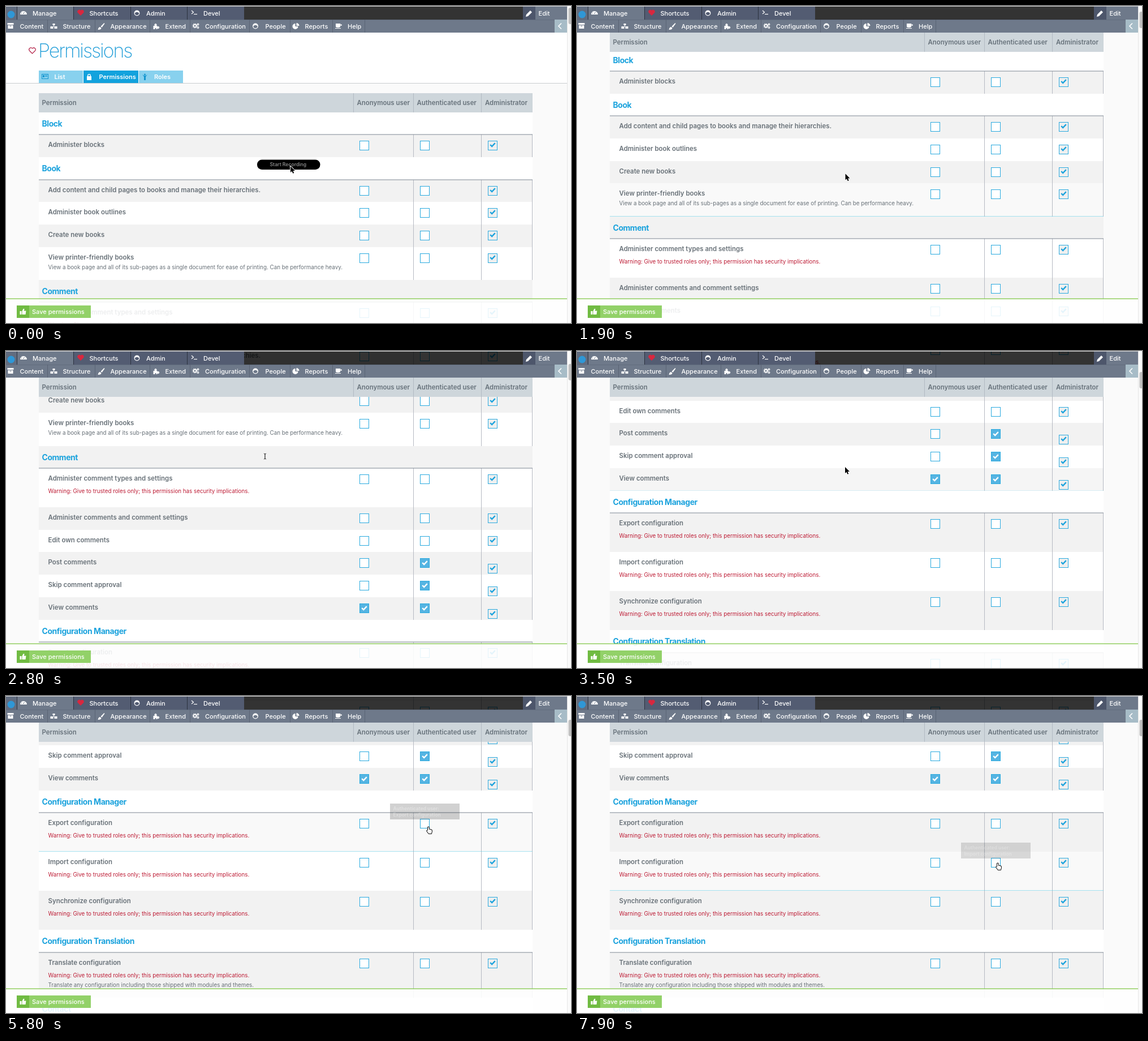
Animation of 999x560 px, one loop 8 s. Source, as an HTML page with a canvas:

```html
<!DOCTYPE html>
<html lang="en">
<head>
<meta charset="utf-8">
<title>Permissions</title>
<style>
html, body { margin: 0; width: 100%; height: 100%; overflow: hidden; background: #fff; }
canvas { display: block; width: 999px; height: 560px; }
</style>
</head>
<body>
<canvas id="stage" width="999" height="560"></canvas>
<script>
const ctx = document.getElementById('stage').getContext('2d');
const LOOP = 8000, STEP = 100;
const BLUE = '#1ca3dd', BODY = '#687178', CYAN = '#55cbe8', RED = '#bd1b34';
const COLS = [633.5, 740.5, 860.5];

const ICONS = {
  gauge: 'M0 9A6 6 0 1 1 12 9ZM6 8L9 4L5 7ZM2 7H3V6H2ZM3 4H4V3H3Z',
  heart: 'M6 11L1 6A3 3 0 0 1 6 2A3 3 0 0 1 11 6Z',
  box: 'M0 0H11V3H0ZM1 4H10V10H1ZM4 5V6H7V5Z',
  tree: 'M4 1H8V4H4ZM0 6H5V10H0ZM7 6H12V10H7ZM5.5 4H6.5V7H5.5Z',
  brush: 'M11 0L5 6L7 8L12 1ZM4 7Q1 7 0 12Q6 12 6 9Z',
  puzzle: 'M1 5H4A2 2 0 1 1 6 5H8V7A2 2 0 1 1 8 9V11H6V9H4V11H1Z',
  pie: 'M5 1A5 5 0 1 0 10 6H5ZM7 0A5 5 0 0 1 12 5H7Z',
  cup: 'M1 1H9V6Q9 8 5 8Q1 8 1 6ZM9 2Q12 2 12 4Q12 5 9 5V4H10V3H9ZM0 9H10V10H0Z',
  pencil: 'M0 12L1 8L8 1L11 4L4 11Z',
  lock: 'M1 5H2V4A3 3 0 0 1 8 4V5H9V12H1ZM3.3 5H6.7V4A1.7 1.7 0 0 0 3.3 4Z',
  card: 'M0 1H12V10H0ZM1 2V9H11V2ZM2 3H5V7H2ZM6 3H10V4H6ZM6 5H10V6H6Z',
  person: 'M4 2A1.5 1.5 0 1 1 7 2A1.5 1.5 0 1 1 4 2ZM1 2L4 4H7L10 2L7 6V12H4V6Z',
  thumb: 'M0 5H3V11H0ZM4 5L6 1Q8 0 8 2L7 4.5H11L10 11H4Z',
  arrow: 'M0 0V11L2.5 8.8L4.3 12.8L6.2 12L4.5 8.1H8Z',
  hand: 'M2 0.8Q3 0 3.8 1V4.5L8 5.4Q9.2 6 9 8L8 12H3.5L0.2 7.5Q0 6 2 6.6Z'
};
for (const name in ICONS) ICONS[name] = new Path2D(ICONS[name]);

// [label, kind, checked columns, administrator box offset]
const ROWS = [
  ['Block', 'section'],
  ['Administer blocks', 'plain'],
  ['Book', 'section'],
  ['Add content and child pages to books and manage their hierarchies.', 'plain'],
  ['Administer book outlines', 'plain'],
  ['Create new books', 'plain'],
  ['View printer-friendly books', 'note'],
  ['Comment', 'section'],
  ['Administer comment types and settings', 'warn'],
  ['Administer comments and comment settings', 'plain'],
  ['Edit own comments', 'plain'],
  ['Post comments', 'plain', [1], 10],
  ['Skip comment approval', 'plain', [1], 10],
  ['View comments', 'plain', [0, 1], 10],
  ['Configuration Manager', 'section'],
  ['Export configuration', 'warn'],
  ['Import configuration', 'warn'],
  ['Synchronize configuration', 'warn'],
  ['Configuration Translation', 'section'],
  ['Translate configuration', 'both'],
  ['Contact', 'section']
];
const HEIGHT = { section: 39.4, plain: 39.7, note: 58.4, warn: 69.1, both: 80 };
const WARNING = 'Warning: Give to trusted roles only; this permission has security implications.';
const PRINT_NOTE = 'View a book page and all of its sub-pages as a single document for ease of printing. Can be performance heavy.';
const SHIP_NOTE = 'Translate any configuration including those shipped with modules and themes.';

const SCROLL = [[0, 0], [1650, 0], [2200, 260], [2600, 260], [3300, 544.5], [3550, 544.5], [4000, 624.5], [LOOP, 624.5]];
const POINTER = [
  [0, 503, 283, 'arrow'], [700, 503, 283, 'arrow'], [1250, 491, 440, 'arrow'], [1550, 487, 376, 'arrow'],
  [1700, 487, 376, 'arrow'], [2150, 457, 185, 'beam'], [2700, 457, 185, 'beam'], [3400, 474, 205, 'arrow'],
  [3750, 474, 205, 'arrow'], [4200, 637, 231, 'hand'], [5200, 637, 231, 'hand'], [5600, 745, 231, 'hand'],
  [6200, 745, 231, 'hand'], [6700, 863, 290, 'hand'], [7250, 863, 290, 'hand'], [7650, 742, 295, 'hand'],
  [LOOP, 742, 295, 'hand']
];
// [from, to, row index]
const HOVERS = [[1150, 2500, 6], [3410, 3750, 13], [4500, 6400, 15], [6400, 8400, 16]];
// [from, to, column, centre y, lines]
const TIPS = [
  [4250, 5350, 0, 226, 'Anonymous user: Export', 'configuration'],
  [5700, 6350, 1, 226, 'Authenticated user:', 'Export configuration'],
  [6870, 7450, 2, 295, 'Administrator: Import', 'configuration'],
  [7825, 8600, 1, 295, 'Authenticated user:', 'Import configuration']
];

const clamp = v => Math.max(0, Math.min(1, v));
const ease = p => p * p * (3 - 2 * p);
const fade = (t, from, to, inMs, outMs) => clamp(Math.min((t - from) / inMs, (to - t) / outMs));

function sample(keys, t) {
  let i = 0;
  while (i < keys.length - 2 && t >= keys[i + 1][0]) i++;
  const a = keys[i], b = keys[i + 1], p = ease(clamp((t - a[0]) / (b[0] - a[0])));
  return a.map((v, k) => typeof v === 'number' ? v + (b[k] - v) * p : p > 0.6 ? b[k] : v);
}

function rect(x, y, w, h, color) {
  ctx.fillStyle = color;
  ctx.fillRect(x, y, w, h);
}

function text(str, x, cy, size, weight, color, spacing = 0) {
  ctx.font = `${weight} ${size}px Inter, "Open Sans", sans-serif`;
  ctx.letterSpacing = spacing + 'px';
  ctx.fillStyle = color;
  ctx.fillText(str, x, cy + size * 0.36);
}

function icon(name, x, y, color, outline) {
  ctx.save();
  ctx.translate(x, y);
  if (outline) {
    ctx.strokeStyle = outline;
    ctx.lineWidth = 2;
    ctx.lineJoin = 'round';
    ctx.stroke(ICONS[name]);
  }
  ctx.fillStyle = color;
  ctx.fill(ICONS[name], 'evenodd');
  ctx.restore();
}

function line(points, color, width) {
  ctx.beginPath();
  points.forEach(([x, y]) => ctx.lineTo(x, y));
  ctx.strokeStyle = color;
  ctx.lineWidth = width;
  ctx.stroke();
}

function disc(x, y, r, color) {
  ctx.beginPath();
  ctx.arc(x, y, r, 0, 7);
  ctx.fillStyle = color;
  ctx.fill();
}

function ring(x, y, r, width, dash = []) {
  ctx.beginPath();
  ctx.arc(x, y, r, 0, 7);
  ctx.setLineDash(dash);
  ctx.strokeStyle = '#fff';
  ctx.lineWidth = width;
  ctx.stroke();
  ctx.setLineDash([]);
}

function face(x, y) {
  ring(x, y, 4.3, 1.3);
  ctx.beginPath();
  ctx.arc(x, y, 4.5, Math.PI, 0);
  ctx.lineTo(x, y - 2);
  ctx.fillStyle = '#fff';
  ctx.fill();
}

function gears(x, y) {
  ring(x + 3.5, y + 5, 2.4, 1.6);
  ring(x + 3.5, y + 5, 3.8, 1.2, [1.5, 1.5]);
  ring(x + 9, y + 2.5, 1.3, 1.2);
  ring(x + 9, y + 8, 1.3, 1.2);
}

function tick(x, y, color) {
  line([[x - 4.3, y - 0.5], [x - 1.3, y + 2.5], [x + 4.3, y - 3.3]], color, 2.4);
}

function checkbox(x, y, state) {
  const fill = { on: '#55b4e2', locked: '#efefef' }[state] || '#fff';
  rect(x - 8.5, y - 8.5, 17, 17, fill);
  ctx.strokeStyle = '#2aaadf';
  ctx.lineWidth = 1;
  ctx.strokeRect(x - 8, y - 8, 16, 16);
  if (state === 'on') tick(x, y, '#fff');
  if (state === 'locked') tick(x, y - 1, BLUE);
}

function drawRow([label, kind, checked = [], shift = 0], index, y, bottom, t) {
  const h = bottom - y;
  rect(58, y, 873, h, index % 2 ? '#f2f2f2' : '#fff');
  if (kind === 'section') {
    text(label, 63.5, y + 20, 14, 700, BLUE, -0.45);
    return;
  }
  const hover = HOVERS.reduce((m, [a, b, row]) => row === index ? Math.max(m, fade(t, a, b, 250, 150)) : m, 0);
  ctx.globalAlpha = hover;
  rect(58, y, 873, h, '#f9f9f9');
  ctx.globalAlpha = 1;
  [720, 840, 930].forEach(x => rect(x, y, 1, h, '#b6bac3'));
  text(label, 74.5, y + 18, 11.45, 600, BODY);
  if (kind === 'warn' || kind === 'both') text(WARNING, 74.5, y + 40.5, 9.8, 400, RED);
  if (kind === 'note') text(PRINT_NOTE, 74.5, y + 35.5, 9.8, 400, BODY);
  if (kind === 'both') text(SHIP_NOTE, 74.5, y + 57.5, 9.8, 400, BODY);
  const cy = y + 19.5;
  COLS.forEach((x, col) =>
    checkbox(x, cy + (col === 2 ? shift : 0), col === 2 ? 'locked' : checked.includes(col) ? 'on' : 'off'));
  if (label.startsWith('Export')) {
    const on = fade(t, 4510, 5150, 150, 150);
    ctx.globalAlpha = on;
    if (on > 0.9) checkbox(COLS[0], cy, 'on');
    else if (on > 0) tick(COLS[0] + 0.5, cy - 0.5, '#55b4e2');
    ctx.globalAlpha = 1;
  }
  ctx.globalAlpha = hover;
  rect(58, bottom - 0.5, 873, 1, CYAN);
  ctx.globalAlpha = 1;
}

function drawPageTop(s) {
  rect(0, 0, 992, 560, '#fafafa');
  rect(0, 0, 992, 136 - s, '#fff');
  rect(0, 136 - s, 992, 1, '#c9cccf');
  ctx.save();
  ctx.translate(40.5, 73 - s);
  ctx.strokeStyle = '#b5264c';
  ctx.lineWidth = 1.2;
  ctx.stroke(ICONS.heart);
  ctx.restore();
  text('Permissions', 57, 79 - s, 34, 200, '#249fd9', -2.1);
  const tabs = [['List', 58, 78, 85.5, 'card'], ['Permissions', 137, 97, 164.5, 'lock'], ['Roles', 235, 78, 262, 'person']];
  tabs.forEach(([label, x, w, tx, glyph], i) => {
    rect(x, 114 - s, w, 22, i === 1 ? '#12a2dd' : '#88d1ee');
    icon(glyph, x + 5, 119 - s, i === 1 ? '#fff' : '#1596cf');
    text(label, tx, 125.5 - s, 11, 600, '#fff');
  });
}

function drawTable(s, t) {
  let top = 188;
  ROWS.forEach((row, i) => {
    const next = top + HEIGHT[row[1]];
    const y = Math.round(top - s), bottom = Math.round(next - s);
    if (bottom > -2 && y < 562) drawRow(row, i, y, bottom, t);
    top = next;
  });
  top = 188;
  ROWS.forEach(row => {
    top += HEIGHT[row[1]];
    if (row[1] === 'section') rect(58, Math.round(top - s) - 0.5, 873, 1, '#7f8894');
  });
  const y = Math.round(Math.max(47, 154 - s));
  rect(58, y, 873, 34, '#ced6db');
  [614, 720, 840].forEach(x => rect(x, y, 1, 34, '#b2bac3'));
  [['Permission', 63.5], ['Anonymous user', 620.5], ['Authenticated user', 726.5], ['Administrator', 847]]
    .forEach(([label, x]) => text(label, x, y + 17, 11.4, 600, '#67727b'));
}

function drawToolbar() {
  rect(0, 0, 992, 1, '#dcdcdc');
  rect(421, 1, 493, 23, 'rgba(0,0,0,.8)');
  rect(0, 1, 421, 23, '#535c72');
  rect(0, 1, 19, 23, '#616c7f');
  rect(20, 1, 99, 23, '#6e798a');
  [19, 119, 220, 320].forEach(x => rect(x, 1, 1, 23, '#2c323f'));
  disc(9, 15, 6.5, '#2f97d6');
  icon('gauge', 25, 6, '#fff');
  icon('heart', 126, 6, '#d9273f');
  face(231.5, 12.5);
  line([[328, 8], [331.5, 11], [328, 14]], '#fff', 1.2);
  line([[332, 14.5], [338, 14.5]], '#fff', 1.2);
  [['Manage', 47], ['Shortcuts', 147.5], ['Admin', 248], ['Devel', 349]]
    .forEach(([label, x]) => text(label, x, 13, 11, 500, '#fff'));
  rect(914, 1, 22, 23, '#4d566b');
  rect(936, 1, 56, 23, '#6e798a');
  icon('pencil', 919, 7, '#fff');
  text('Edit', 941.5, 13, 11, 500, '#fff');

  rect(0, 24, 992, 23, '#6e798a');
  rect(0, 24, 992, 1, '#626d7e');
  const menu = [['Content', 24.5, 73, 'box'], ['Structure', 100.5, 157, 'tree'], ['Appearance', 184.5, 254, 'brush'],
    ['Extend', 281.5, 325, 'puzzle'], ['Configuration', 352, 430, ''], ['People', 458.5, 502, ''],
    ['Reports', 528.5, 577, 'pie'], ['Help', 604, 634, 'cup']];
  menu.forEach(([label, x, edge, glyph]) => {
    text(label, x, 36, 11, 500, '#fff');
    rect(edge, 24, 1, 23, '#5a6475');
    if (glyph) icon(glyph, x - 22, 30, '#fff');
  });
  gears(330.5, 30);
  face(441, 35.5);
  rect(970, 24, 22, 23, '#a7bcc7');
  line([[982, 30.5], [977, 35.5], [982, 40.5]], '#fff', 1.6);
}

function drawFooter() {
  rect(0, 517, 992, 43, 'rgba(255,255,255,.88)');
  rect(0, 516.5, 992, 1.5, '#93cf62');
  rect(19, 529, 131, 22, '#92d168');
  rect(19, 529, 22, 22, '#70bb42');
  icon('thumb', 24.5, 534, '#fff');
  text('Save permissions', 46, 540, 11, 500, '#fff');
}

function drawScrollbar(s) {
  rect(992, 0, 7, 560, '#fafafa');
  rect(992, 0, 1, 560, '#e6e6e6');
  ctx.beginPath();
  ctx.roundRect(994.5, 3 + s * 0.0625, 6, 29, 3);
  ctx.fillStyle = '#c1c1c1';
  ctx.fill();
}

function drawTips(t) {
  TIPS.forEach(([from, to, col, cy, first, second]) => {
    const x = Math.round(COLS[col] - 61.5);
    ctx.globalAlpha = fade(t, from, to, 300, 200);
    rect(x, cy - 36, 123, 28, 'rgba(0,0,0,.54)');
    text(first, x + 5.5, cy - 27.5, 8.4, 700, '#fff');
    text(second, x + 5.5, cy - 16.5, 8.4, 700, '#fff');
  });
  ctx.globalAlpha = 1;
}

function drawPill(t) {
  ctx.globalAlpha = 1 - clamp((t - 650) / 300);
  ctx.beginPath();
  ctx.roundRect(444, 271.5, 111.5, 17.5, 8.5);
  ctx.fillStyle = '#000';
  ctx.fill();
  text('Start Recording', 466.5, 280, 8.6, 600, '#858585');
  ctx.globalAlpha = 1;
}

function drawPointer(t) {
  const [, x, y, kind] = sample(POINTER, t);
  if (kind === 'arrow') icon('arrow', x, y, '#000', '#fff');
  else if (kind === 'hand') icon('hand', x - 1, y, '#fff', '#111');
  else {
    line([[x - 2, y - 5], [x, y - 4], [x + 2, y - 5]], '#222', 1);
    line([[x, y - 4], [x, y + 4]], '#222', 1.2);
    line([[x - 2, y + 5], [x, y + 4], [x + 2, y + 5]], '#222', 1);
  }
}

function draw(t) {
  const [, s] = sample(SCROLL, t);
  drawPageTop(s);
  drawTable(s, t);
  drawToolbar();
  drawFooter();
  drawScrollbar(s);
  drawTips(t);
  drawPill(t);
  drawPointer(t);
}

function tickFrame() {
  const t = performance.now() % LOOP;
  draw(Math.floor(t / STEP) * STEP);
  requestAnimationFrame(tickFrame);
}
tickFrame();
</script>
</body>
</html>
```
